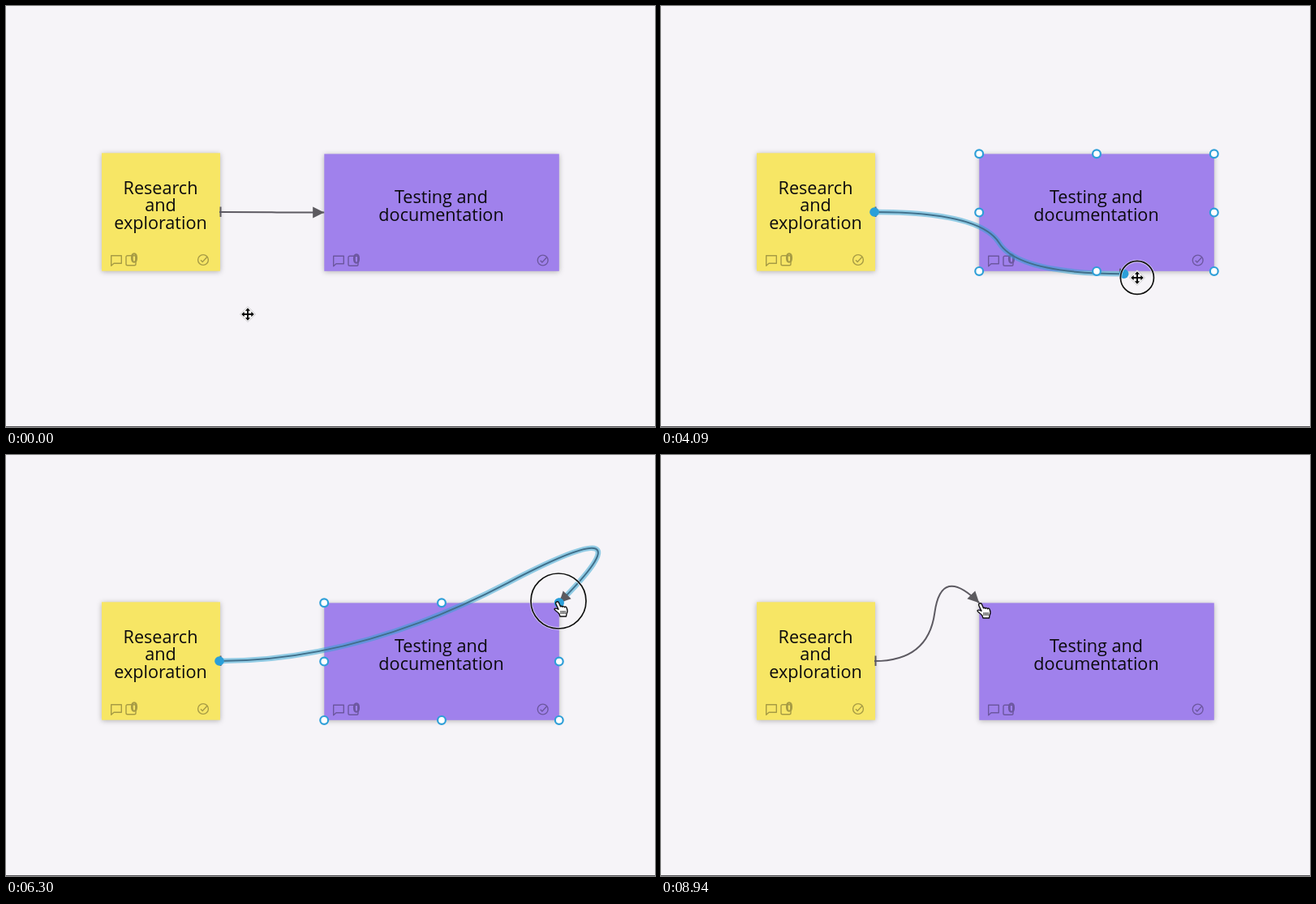
Recreate the animation shown at these times as an HTML page. Size 800 by 519 pixels, loop 9 s.

```html
<!DOCTYPE html>
<html lang="en">
<head>
<meta charset="utf-8">
<title>Connector demo</title>
<style>
  html, body { margin: 0; width: 100%; height: 100%; overflow: hidden; background: #f6f4f8; }
  svg { display: block; width: 800px; height: 519px; }
  .note { filter: drop-shadow(0 1px 3px rgba(0, 0, 0, .28)); }
  .title { font: 21.6px "Open Sans", "Noto Sans", sans-serif; text-anchor: middle; fill: #0b0a0d; }
  .icons { fill: none; stroke: #000; stroke-width: 1.4; opacity: .32; }
  .icons text { font: 700 7px "Open Sans", sans-serif; text-anchor: middle; fill: #000; stroke: none; }
  .wire { fill: none; stroke-width: 2; }
  .halo { fill: none; stroke: #2fa4d2; stroke-width: 6.6; opacity: .5; }
  .handle { fill: #fff; stroke: #2e9fd8; stroke-width: 2.2; }
  .dot { fill: #2a9fd9; }
  .panel { fill: #fff; stroke: #b9b8bc; stroke-width: 1; filter: drop-shadow(0 3px 5px rgba(0, 0, 0, .3)); }
  .menu text { font: 16px Lato, sans-serif; fill: #5f5f64; }
  .menu .small { font-size: 11px; text-anchor: middle; }
  .line { fill: none; stroke: #5a5a5e; stroke-width: 2; }
  .solid { fill: #5a5a5e; }
  .rule { stroke: #dcdbdf; }
</style>
</head>
<body>
<svg viewBox="0 0 800 519">
  <defs>
    <g id="badges">
      <path d="M.7 .7H13.3V10.3H4L.7 13.2Z" stroke-linejoin="round"/>
      <rect x="19" y=".7" width="12" height="12" rx="1.8"/>
      <text x="25" y="9.3">0</text>
    </g>
    <g id="check">
      <circle r="6.4"/>
      <path d="M-3 .3L-.8 2.5L5.2 -4"/>
    </g>
  </defs>
  <rect width="800" height="519" fill="#f6f4f8"/>
  <rect y="518" width="800" height="1" fill="#55545a"/>

  <rect class="note" x="118" y="181.3" width="146" height="145.4" fill="#f7e665"/>
  <g class="title">
    <text x="190.5" y="231.5">Research</text>
    <text x="190.5" y="253">and</text>
    <text x="190.5" y="274.8">exploration</text>
  </g>
  <g class="icons">
    <use href="#badges" x="129" y="307"/>
    <use href="#check" x="243" y="313"/>
  </g>

  <rect class="note" x="392.3" y="182.4" width="289.5" height="144.4" fill="#a081ec"/>
  <g class="title">
    <text x="536.5" y="243">Testing and</text>
    <text x="536.5" y="264.8">documentation</text>
  </g>
  <g class="icons">
    <use href="#badges" x="403" y="307.5"/>
    <use href="#check" x="661.7" y="313.5"/>
  </g>

  <path id="halo" class="halo"/>
  <path id="wire" class="wire"/>
  <path d="M264.5 247.5V260" stroke="#5d5a62" stroke-width="2"/>
  <path id="arrow" d="M0 0L-14 -7V7Z" fill="#5c5a5f"/>
  <path id="bar" d="M-4.5 -6.5V6.5" stroke="#5c5a5f" stroke-width="2"/>
  <g id="handles" class="handle"></g>
  <g id="dots" class="dot">
    <circle cx="263" cy="254" r="5.8"/>
    <circle id="endDot" r="5.8"/>
  </g>

  <g id="menu" class="menu">
    <rect class="panel" x="194.5" y="271.5" width="255" height="153.5" rx="3.5"/>
    <path class="rule" d="M195 359.5H449M370.5 360V425"/>
    <g class="solid">
      <path d="M215 302.5V298.8L226 287.8L229.7 291.5L218.7 302.5ZM227 286.8L228.6 285.2Q229.3 284.7 230 285.2L232.3 287.5Q232.8 288.2 232.3 288.9L230.7 290.5Z"/>
      <path d="M216.5 321.5H220.5L222 320H225.5L227 321.5H231V323.6H216.5ZM217.5 325H230V337Q230 339 228 339H219.5Q217.5 339 217.5 337Z"/>
      <path d="M334.5 378.5L346 385L334.5 391.5Z"/>
      <path d="M289.5 384.5H297.5L293.5 389.2ZM273 385.5H281L277 380.8Z"/>
      <circle cx="410.5" cy="385" r="9.6"/>
    </g>
    <path d="M221.7 328V335.5M225.8 328V335.5" stroke="#fff" stroke-width="1.6"/>
    <path class="line" d="M220 378V392M220 385H242M323 385H336M281 379.5A7.5 7.5 0 0 1 293.5 385M277 385A7.5 7.5 0 0 0 289.5 390.7"/>
    <circle class="line" cx="410.5" cy="385" r="12.6" style="stroke-width:1.7"/>
    <text x="248.3" y="298">Update Label</text>
    <text x="248.3" y="333.8">Remove Connector</text>
    <text class="small" x="233.5" y="415">START</text>
    <text class="small" x="335" y="415">END</text>
    <text class="small" x="411" y="415">COLOR</text>
  </g>

  <g id="pointer">
    <g id="ring" fill="none">
      <circle stroke="#fff" stroke-width="3.4" opacity=".6"/>
      <circle stroke="#111" stroke-width="1.7"/>
    </g>
    <g id="hand" stroke-linejoin="round">
      <path id="palm" d="M-2 1C-3.4 1.5 -3.6 2.6 -3.2 3.5L0 10.4C-2 9 -4.5 8.6 -5 10C-5 11.5 -1 13 1 16L2 19H9.5L10 16C11.5 13 11 10 10 8C9.5 6.8 8 6.8 7.5 7.8C7 6.3 5.3 6.2 4.8 7.3C4.3 6 3 6 2.5 6.8L.3 1.8C-.3 .8 -1.2 .6 -2 1Z" fill="#fff" stroke="#111" stroke-width="1.4"/>
      <path d="M3.2 12V16M5.6 12V16M8 12V16" stroke="#111" stroke-width="1.1"/>
    </g>
    <g id="move">
      <path d="M0 -9.5L9.5 0L0 9.5L-9.5 0Z" fill="#fff" stroke="#b5b3b9" stroke-width=".7"/>
      <path d="M0 -7.8L3.2 -4.3H1V-1H4.3V-3.2L7.8 0L4.3 3.2V1H1V4.3H3.2L0 7.8L-3.2 4.3H-1V1H-4.3V3.2L-7.8 0L-4.3 -3.2V-1H-1V-4.3H-3.2Z" fill="#080808"/>
    </g>
  </g>
</svg>
<script>
const LOOP = 9000;
const MENU_AT = 830, GRAB = 1950, DROP = 8350, DESELECT = 8520;
const START = { x: 263, y: 254 };
const LAG = 50, SNAP = 34;
const $ = id => document.getElementById(id);
const show = (el, on) => el.style.display = on ? '' : 'none';
const put = (el, p, turn = 0) => el.setAttribute('transform', `translate(${p.x} ${p.y}) rotate(${turn})`);

// Eight attachment points, each with its outward direction
const anchors = [];
for (const dy of [-1, 0, 1]) {
  for (const dx of [-1, 0, 1]) {
    if (!dx && !dy) continue;
    const len = Math.hypot(dx, dy);
    anchors.push({ x: 537 + dx * 144.8, y: 254.6 + dy * 72.3, dx: dx / len, dy: dy / len });
  }
}
const left = anchors[3];
$('handles').innerHTML = anchors.map(a => `<circle cx="${a.x}" cy="${a.y}" r="4.9"/>`).join('');

// Pointer moves: from time, to time, x, y, sideways bow, vertical bow
const moves = [
  [120, 640, 322, 252, 0, 0],
  [1150, 1640, 390, 252, 0, 0],
  [2050, 2500, 393, 323, -12, 0],
  [2950, 3480, 538, 329, 0, 12],
  [3856, 4456, 682, 328, 0, 7],
  [4760, 5230, 666, 253, 20, 0],
  [5560, 6060, 681, 180, 16, 0],
  [6400, 6900, 541, 176, 0, -12],
  [7360, 7930, 395, 182, 0, -10]
];

function pointerAt(t) {
  let x = 298, y = 380;
  for (const [from, to, tx, ty, bx, by] of moves) {
    if (t <= from) break;
    const p = Math.min(1, (t - from) / (to - from));
    const e = p * p * (3 - 2 * p), bow = 4 * e * (1 - e);
    x += (tx - x) * e + bx * bow;
    y += (ty - y) * e + by * bow;
  }
  return { x, y };
}

const nearAnchor = p => anchors.find(a => Math.hypot(a.x - p.x, a.y - p.y) < SNAP);

// Two parabolas meeting halfway between their control points
function wirePath(end) {
  const reach = .38 * Math.hypot(end.x - START.x, end.y - START.y) + 10;
  const ax = START.x + reach, ay = START.y;
  const bx = end.x + end.dx * reach, by = end.y + end.dy * reach;
  return `M${START.x} ${START.y}Q${ax} ${ay} ${(ax + bx) / 2} ${(ay + by) / 2}Q${bx} ${by} ${end.x} ${end.y}`;
}

function draw(t) {
  const p = pointerAt(t);
  const dragging = t >= GRAB && t < DROP;
  const selected = t >= MENU_AT && t < DESELECT;
  const snap = nearAnchor(p);
  const end = t < GRAB ? left : snap || { ...pointerAt(t - LAG), dx: -1, dy: 0 };
  if (!snap && dragging) end.y -= 3.5;

  const d = wirePath(end);
  $('halo').setAttribute('d', d);
  $('wire').setAttribute('d', d);
  $('wire').setAttribute('stroke', selected ? '#40708c' : '#5d5a62');
  show($('halo'), selected);
  show($('dots'), selected);
  show($('handles'), t >= GRAB && t < DESELECT);
  show($('menu'), t >= MENU_AT && t < GRAB);

  const free = dragging && !snap;
  show($('arrow'), !free);
  show($('bar'), free);
  put($('arrow'), end, Math.atan2(-end.dy, -end.dx) * 180 / Math.PI);
  put($('bar'), end);
  put($('endDot'), end);

  const onWire = t >= 560 && t < GRAB;
  const hand = onWire || (t >= GRAB && snap);
  put($('pointer'), p);
  show($('hand'), hand);
  show($('move'), !hand);
  show($('ring'), dragging || (t >= 690 && t < MENU_AT));
  for (const c of $('ring').children) c.setAttribute('r', free ? 20.5 : 34);
}

function tick() {
  draw(performance.now() % LOOP);
  requestAnimationFrame(tick);
}
tick();
</script>
</body>
</html>
```
